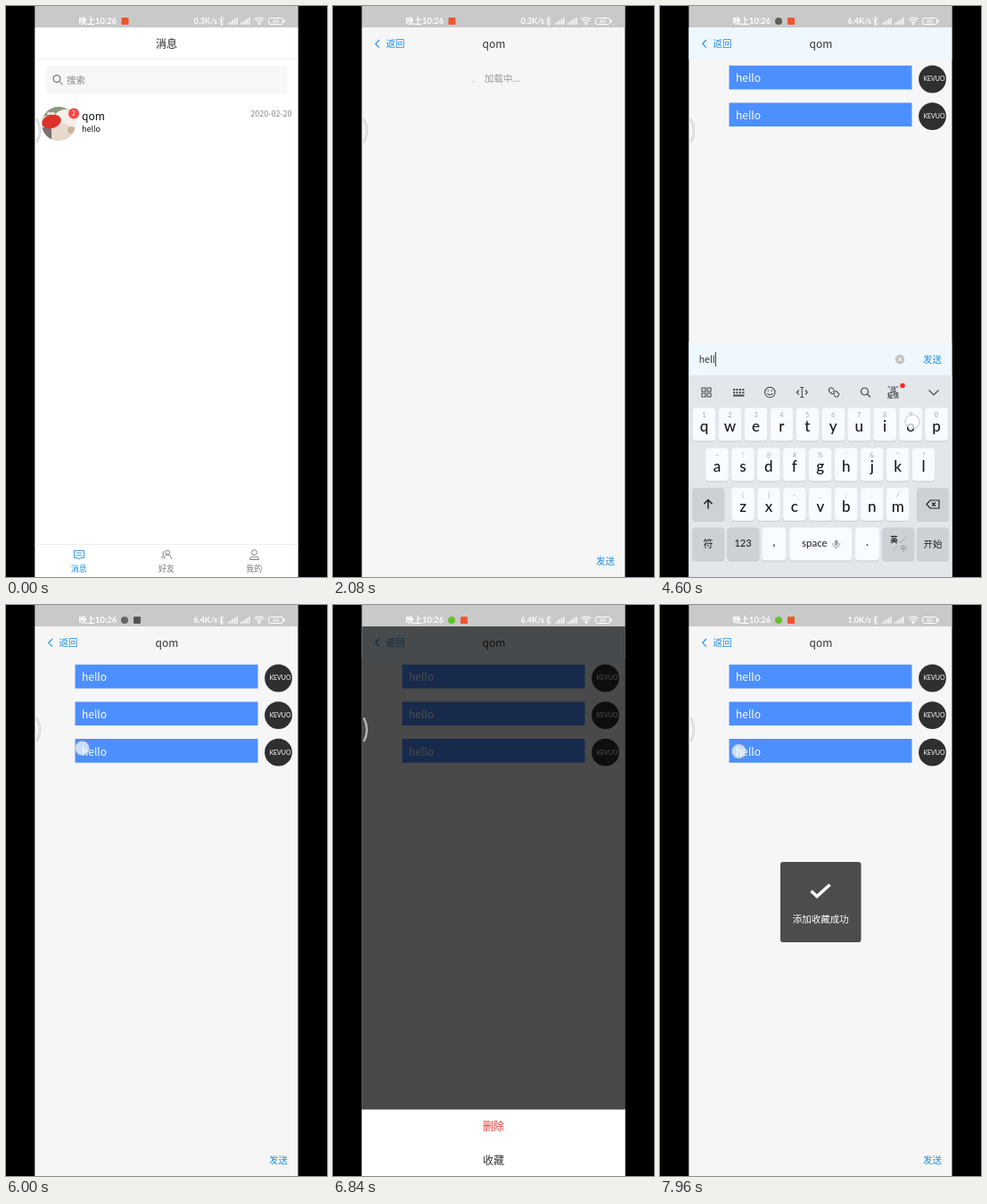
Write an HTML page with a canvas that moves like this. It is 360 px wide and 640 px high and loops after 8 s.

```html
<!DOCTYPE html>
<html lang="zh">
<head>
<meta charset="utf-8">
<title>Chat</title>
<style>
html, body { margin: 0; width: 100%; height: 100%; overflow: hidden; background: #000; }
canvas { display: block; width: 360px; height: 640px; }
</style>
</head>
<body>
<canvas id="stage"></canvas>
<script>
const LOOP = 8000, NAME = 'qom', BADGE = 'KEVUO';
const LEFT = 32.3, WIDTH = 295.4;
const CJK = '"Noto Sans CJK SC", "Noto Sans CJK", "Noto Sans", sans-serif';
const ROUND = 'Lato, "Noto Sans CJK SC", sans-serif';
const BLUE = '#1b8fe6', PAGE = '#f6f6f6', ALICE = '#f0f8ff';
const canvas = document.getElementById('stage');
const dpr = window.devicePixelRatio || 1;
canvas.width = 360 * dpr;
canvas.height = 640 * dpr;
const c = canvas.getContext('2d');

const clamp = v => Math.min(1, Math.max(0, v));
const ease = (t, from, to) => 1 - (1 - clamp((t - from) / (to - from))) ** 3;
const within = (t, from, to) => t >= from && t < to;

function text(s, x, y, size, color, align = 'left', font = CJK, weight = 400) {
  c.font = `${weight} ${size}px ${font}`;
  c.fillStyle = color;
  c.textAlign = align;
  c.fillText(s, x, y);
}
function box(x, y, w, h, color, r = 0) {
  c.fillStyle = color;
  c.beginPath();
  c.roundRect(x, y, w, h, r);
  c.fill();
}
const band = (y, h, color) => box(LEFT, y, WIDTH, h, color);
function disc(x, y, r, color) {
  c.fillStyle = color;
  c.beginPath();
  c.arc(x, y, r, 0, 7);
  c.fill();
}
function line(d, color, width = 1, x = 0, y = 0) {
  c.save();
  c.translate(x, y);
  c.strokeStyle = color;
  c.lineWidth = width;
  c.stroke(new Path2D(d));
  c.restore();
}
const ring = r => `M${-r} 0a${r} ${r} 0 1 0 ${2 * r} 0a${r} ${r} 0 1 0 ${-2 * r} 0`;
const LENS = 'M-5 -1a4 4 0 1 0 8 0a4 4 0 1 0 -8 0M2 2L5.5 5.5';

function statusBar(t) {
  band(0, 24, '#c9c9c9');
  text('晚上10:26', 81.5, 20, 9.3, '#fff', 'left', ROUND, 700);
  const dim = within(t, 3280, 4000) || within(t, 5760, 6400);
  const orange = dim ? '#555' : '#f0562e';
  if (t < 3600) box(129.5, 13, 8, 8, orange, 1);
  else {
    disc(133, 17, 4, dim ? '#666' : t < 6400 ? '#5a5f58' : '#62c02c');
    box(143, 13, 8, 8, orange, 1);
  }
  const speed = t < 3600 ? '0.3K/s' : t < 7240 ? '6.4K/s' : '1.0K/s';
  text(speed, 237, 20, 9, '#fff', 'right', ROUND, 700);
  line('M-2.5 -2.5L2.5 2.5L0 5V-5L2.5 -2.5L-2.5 2.5', '#fff', .9, 241.5, 17);
  for (const x of [249, 263])
    for (let i = 0; i < 5; i++) box(x + i * 2.3, 19 - i * 1.5, 1.3, 1.8 + i * 1.5, '#fff');
  line('M-5.5 -2Q0 -6 5.5 -2M-3.7 0Q0 -2.8 3.7 0M-2 2Q0 .6 2 2', '#fff', 1.2, 284, 17);
  disc(284, 20.3, 1, '#fff');
  c.strokeStyle = '#fff';
  c.lineWidth = 1;
  c.beginPath();
  c.roundRect(294.5, 13.5, 16, 7, 2);
  c.stroke();
  box(311.2, 15.5, 1.5, 3, '#fff');
  text('60', 302.5, 19.3, 6, '#fff', 'center', ROUND, 700);
}

function photo() {
  c.save();
  c.beginPath();
  c.arc(59, 132, 19, 0, 7);
  c.clip();
  box(40, 112, 40, 40, '#cfcac2');
  box(40, 112, 40, 11, '#8d9a7c');
  disc(66, 129, 13, '#f3eee8');
  disc(62, 143, 12, '#e6d9cd');
  disc(73, 139, 4, '#c9b39c');
  box(40, 136, 11, 16, '#77736c', 3);
  c.fillStyle = '#dd3129';
  c.beginPath();
  c.ellipse(51, 129.5, 11, 7.5, -.3, 0, 7);
  c.fill();
  box(46, 119, 9, 3, '#dfe3d4', 2);
  c.restore();
}

function listPage() {
  band(24, 616, '#fff');
  text('消息', 180, 46.5, 12, '#222', 'center');
  band(59, 1, '#f0f0f0');
  box(45, 67, 270.5, 31.5, '#f7f7fa', 2);
  line(LENS, '#555', 1, 58, 82.5);
  text('搜索', 68, 86.5, 10.5, '#888');
  photo();
  disc(76, 120.5, 6, '#fa4444');
  text('2', 76, 123.2, 7, '#fff', 'center');
  text(NAME, 85, 127.5, 12, '#111', 'left', CJK, 500);
  text('hello', 85, 141.3, 9, '#111');
  text('2020-02-20', 320.5, 124, 9, '#888', 'right');
  band(603, 1, '#f0f0f0');
  line('M-5.5 -4.5H5.5V3.5H2L0 5L-2 3.5H-5.5ZM-3 -2H3M-3 .8H3', BLUE, .9, 82, 615);
  line('M-1 -2.5a2.3 2.3 0 1 0 4.6 0a2.3 2.3 0 1 0 -4.6 0M-3 5Q-2.5 0 1.2 0Q5 0 5.5 5M-2.5 -4.5Q-5.5 -2 -3 .5Q-5 1 -5.5 4', '#777', .9, 180, 615);
  line('M-3 -2.5a3 3 0 1 0 6 0a3 3 0 1 0 -6 0M-5 5.5Q-5 2 -2 2L0 3.5L2 2Q5 2 5 5.5Z', '#777', .9, 278.5, 615);
  ['消息', '好友', '我的'].forEach((s, i) =>
    text(s, 81.7 + i * 98.3, 634, 9, i ? '#777' : BLUE, 'center'));
}

function message(i) {
  const y = 66.8 + i * 41.6;
  box(77.5, y, 205, 26.7, '#4c8fff');
  text('hello', 85, y + 18.5, 12, '#fff');
  disc(305.5, y + 15.2, 15.4, '#2f2f2f');
  text(BADGE, 307.5, y + 17.5, 7, '#fff', 'center', ROUND);
}

// Moment each letter of the draft arrives
const typed = [3800, 4020, 4260, 4440, 4680];

function chatPage(t) {
  const open = within(t, 3260, 5320);
  const tint = open || within(t, 6480, 7440);
  band(24, 616, PAGE);
  if (tint) band(24, 36, ALICE);
  line('M52 38L47.7 42.3L52 46.6', BLUE, 1.1);
  text('返回', 59.5, 46.3, 10.5, BLUE);
  text(NAME, 180.5, 47, 12, '#333', 'center');
  if (t < 2440) {
    text('加载中...', 169.7, 85, 10.5, '#999');
    disc(157.8, 85, .8, '#aaa');
  } else {
    const count = t < 5160 ? 2 : 3;
    for (let i = 0; i < count; i++) message(i);
  }
  const mid = open ? 396 : 622;
  if (open) {
    band(377, 38, ALICE);
    band(415, 225, '#c9c9c9');
    const draft = t < 5160 ? 'hello'.slice(0, typed.filter(k => t >= k).length) : '';
    text(draft, 43.7, 400, 10.5, '#333');
    if ((t - 3260) % 1000 < 500) box(43.7 + c.measureText(draft).width, 388, 1, 16, '#333');
    if (draft) {
      disc(269, mid, 5.2, '#c3c3c3');
      line('M-2 -2L2 2M2 -2L-2 2', '#fff', 1, 269, mid);
    }
  }
  text('发送', 295, mid + 3.8, 10.5, BLUE);
}

function key(x, y, w, gray) {
  box(x, y + 1, w, 37, '#c6cad0', 4);
  box(x, y, w, 37, gray ? '#cdd0d5' : '#f8fbff', 4);
}

function toolbar() {
  const ink = '#454850';
  for (const x of [-5, 1]) for (const y of [-5, 1])
    line(`M${x} ${y}h4v4h-4z`, ink, 1.1, 52, 433);
  for (let r = 0; r < 2; r++)
    for (let i = 0; i < 4; i++) box(82 + i * 3.4, 429 + r * 3.3, 2.2, 2, ink);
  box(82, 435.6, 12.4, 2, ink);
  line(ring(5.7) + 'M-3 1Q0 5 3 1M-2 -2.5V-1M2 -2.5V-1', ink, 1.1, 123.3, 433);
  line('M-2 -5.5H2M0 -5.5V5.5M-2 5.5H2M-3.5 -2.5L-6 0L-3.5 2.5M3.5 -2.5L6 0L3.5 2.5', ink, 1.1, 159.3, 433);
  line('M0 -3Q-3 -7 -5 -4Q-7 -2 -3 1Q0 3 1 0M0 3Q3 7 5 4Q7 2 3 -1Q0 -3 -1 0', ink, 1.1, 195, 433);
  line(LENS, ink, 1.2, 230.5, 433);
  text('“战”', 261.5, 431.5, 6.5, ink, 'center', CJK, 700);
  text('疫情', 261.5, 438.5, 6.5, ink, 'center', CJK, 700);
  line('M-5.5 -2.5L0 3L5.5 -2.5', ink, 1.2, 307, 433);
}

function keyboard(t) {
  const shown = t < 5320 ? ease(t, 3262, 3545) : 1 - ease(t, 5320, 5540);
  if (!shown) return;
  c.save();
  c.translate(0, 226 * (1 - shown));
  band(414, 226, '#e3e6eb');
  toolbar();
  disc(272, 425.5, 2.7, within(t, 3260, 4000) ? '#444' : '#f22');
  const rows = [
    ['qwertyuiop', '1234567890', 49.5, 450.5],
    ['asdfghjkl', "~!@#%'&*?", 64, 495.5],
    ['zxcvbnm', '()-_:;/', 93, 540]
  ];
  for (const [letters, marks, x0, y] of rows)
    [...letters].forEach((s, i) => {
      const x = x0 + i * 28.95;
      key(x - 12.8, y, 25.6);
      text(marks[i], x, y + 10.5, 7.5, '#a4a8ae', 'center', ROUND);
      text(s, x, y + 26.7, 17, '#17181a', 'center', ROUND, 500);
    });
  for (const x of [36.3, 288]) key(x, 540, 36, true);
  line('M0 5V-5M-4.5 -.5L0 -5L4.5 -.5', '#222', 1.5, 54, 558.5);
  line('M-7 0L-3 -4.5H7V4.5H-3ZM-1 -2L3 2M3 -2L-1 2', '#222', 1.2, 306, 558.5);
  const bottom = [[36.3, 36, 1], [75.3, 36, 1], [114.3, 27], [145.3, 70], [219, 27], [249.3, 36, 1], [288, 36, 1]];
  for (const [x, w, gray] of bottom) key(x, 584.5, w, gray);
  text('符', 54, 606.5, 11, '#222', 'center');
  text('123', 93, 606, 11, '#222', 'center', ROUND, 500);
  text(',', 127.8, 605, 14, '#222', 'center', ROUND);
  text('space', 159, 606, 11.5, '#222', 'left', ROUND);
  box(195.7, 598.5, 4, 6.5, '#a0a3a8', 2);
  line('M-4 0Q-4 4.5 0 4.5Q4 4.5 4 0M0 4.5V6.5', '#a0a3a8', 1, 197.7, 602);
  text('.', 232.5, 605, 14, '#222', 'center', ROUND);
  text('英', 262.5, 601, 8.5, '#222', 'center', CJK, 700);
  text('中', 273, 611, 8, '#888', 'center');
  line('M261 610L266 605M269 602L276 595', '#999', .8);
  text('开始', 306, 606.5, 10.5, '#222', 'center');
  c.restore();
}

function sheet(t) {
  const shown = t < 7200 ? ease(t, 6480, 6760) : 1 - ease(t, 7200, 7440);
  if (!shown) return;
  band(24, 616, `rgba(0,0,0,${.7 * shown})`);
  c.save();
  c.translate(0, 75 * (1 - shown));
  band(565.5, 75, '#fff');
  text('删除', 180, 589.3, 12, '#e23c39', 'center');
  text('收藏', 180, 627, 12, '#333', 'center');
  c.restore();
}

function toast(t) {
  c.globalAlpha = clamp((t - 7440) / 160);
  box(135, 288, 90.5, 90, '#4c4c4c', 3);
  line('M169.5 320.5L176 326.5L190.5 313.5', '#fff', 3.6);
  text('添加收藏成功', 180.2, 355.7, 10.5, '#fff', 'center');
  c.globalAlpha = 1;
}

function edgeHandle(t) {
  const curve = 'M34.5 126.5Q41.5 140 34.5 153';
  line(curve, within(t, 6480, 7440) ? '#b4b4b4' : '#cecece', 2.4);
  if (!within(t, 6480, 7440)) line(curve, '#eee', 1);
}

// Finger contacts: start, end, x, y
const touches = [
  [200, 340, 150, 132], [3000, 3120, 130, 622],
  [3740, 3860, 209, 514], [3960, 4080, 107, 470], [4200, 4320, 296, 514],
  [4380, 4500, 296, 514], [4560, 4700, 283, 466], [5000, 5120, 305, 396],
  [5860, 6500, 85.5, 160.5], [6880, 7000, 180, 622], [7880, 8000, 88.5, 164]
];

function fingers(t) {
  for (const [from, to, x, y] of touches) {
    if (!within(t, from, to)) continue;
    disc(x, y, 8, 'rgba(255,255,255,.7)');
    line(ring(8), 'rgba(165,165,165,.55)', 1.2, x, y);
  }
}

function draw(t) {
  c.setTransform(dpr, 0, 0, dpr, 0, 0);
  box(0, 0, 360, 640, '#000');
  if (t < 800) listPage();
  if (t >= 440) {
    c.save();
    c.translate(WIDTH * (1 - ease(t, 440, 800)), 0);
    chatPage(t);
    c.restore();
    box(LEFT + WIDTH, 0, 360, 640, '#000');
  }
  keyboard(t);
  sheet(t);
  if (t > 7440) toast(t);
  statusBar(t);
  edgeHandle(t);
  fingers(t);
}

const start = performance.now();
function tick() {
  draw((performance.now() - start) % LOOP);
  requestAnimationFrame(tick);
}
tick();
</script>
</body>
</html>
```
